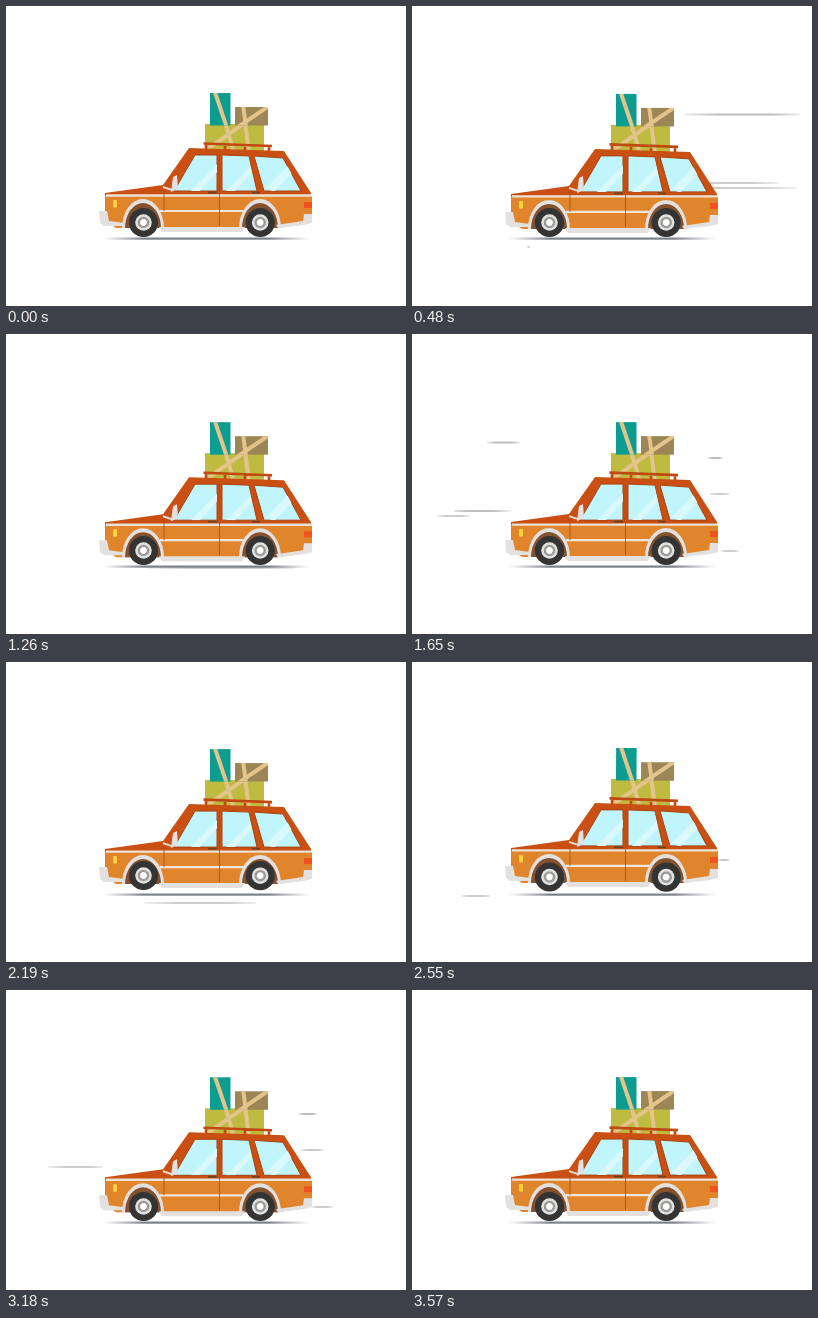
Recreate the animation shown at these times as an HTML page. Size 400 by 300 pixels, loop 3600 ms.

```html
<!DOCTYPE html>
<html lang="en">
<head>
<meta charset="utf-8">
<title>Road trip</title>
<style>
  html, body { margin: 0; width: 100%; height: 100%; overflow: hidden; background: #fff; }
  svg { display: block; width: 100vw; height: 100vh; }
  .dark { fill: #c95012; }
  .paint { fill: #e0852c; }
  .trim { fill: #e2e1df; }
  .arch { fill: #85522f; }
  .strap { fill: none; stroke: #e3c58c; stroke-width: 4; }
</style>
</head>
<body>
<svg viewBox="0 0 400 300">
  <defs>
    <linearGradient id="fade">
      <stop offset="0" stop-color="#bcbcbe" stop-opacity=".3"/>
      <stop offset=".3" stop-color="#bcbcbe"/>
      <stop offset=".75" stop-color="#bcbcbe"/>
      <stop offset="1" stop-color="#bcbcbe" stop-opacity=".3"/>
    </linearGradient>
    <linearGradient id="shade">
      <stop offset="0" stop-color="#7d8189" stop-opacity="0"/>
      <stop offset=".2" stop-color="#7d8189"/>
      <stop offset=".8" stop-color="#7d8189"/>
      <stop offset="1" stop-color="#7d8189" stop-opacity="0"/>
    </linearGradient>
    <path id="glass" d="M189 149H211V185H168ZM216 149L243 150L251 185H216ZM248 150L277 152L295 185H258Z"/>
    <clipPath id="panes"><use href="#glass"/></clipPath>
    <clipPath id="tealClip"><rect x="204" y="87" width="20.5" height="32.5"/></clipPath>
    <clipPath id="brownClip"><rect x="229" y="101" width="33" height="18.5"/></clipPath>
    <clipPath id="oliveClip"><rect x="199" y="118" width="59" height="27"/></clipPath>
    <g id="wheel">
      <circle r="14.600" fill="#343434"/>
      <circle r="8.300" fill="#e2e1df"/>
      <circle r="4.600" fill="#fff" stroke="#9c9b99" stroke-width="2.400"/>
    </g>
    <g id="fender">
      <path class="trim" d="M-21 5A21 29 0 0 1 21 5Z"/>
      <path class="arch" d="M-18 5A18 25 0 0 1 18 5Z"/>
    </g>
  </defs>

  <g id="lines" fill="url(#fade)"></g>
  <rect x="97" y="231.500" width="206" height="2.200" fill="url(#shade)"/>

  <g id="olive">
    <rect x="199" y="118" width="59" height="27" fill="#bebb40"/>
    <path class="strap" clip-path="url(#oliveClip)" d="M219 116L228 147M239 116L243 147M240 116L200 144"/>
  </g>
  <g id="brown">
    <rect x="229" y="101" width="33" height="18.500" fill="#9d8655"/>
    <path class="strap" clip-path="url(#brownClip)" d="M263 100L232 121M237 99L240 121"/>
  </g>
  <g id="teal">
    <rect x="204" y="87" width="20.500" height="32.500" fill="#0c9d90"/>
    <path class="strap" clip-path="url(#tealClip)" d="M208.500 85L221 122"/>
  </g>

  <g id="car">
    <path d="M197.500 137.500L266 140M200 137V143M219 138V144M239 139V144M263 140V146" fill="none" stroke="#c0490f" stroke-width="2.600"/>
    <path class="dark" d="M183 142L278 145L305 187V192H99V187L157 179Z"/>
    <use href="#glass" fill="#c0f5fd" stroke="#a9430f" stroke-width="1"/>
    <path clip-path="url(#panes)" fill="#d9f9fd" d="M184 186L214 155V163L193 186ZM219 186L245 160V168L228 186ZM260 182L282 160L286 167L268 186Z"/>
    <path class="paint" d="M99 189H306V210L298 217L272 222H110L99 214Z"/>
    <path d="M100 189.500H306" stroke="#ebe2d6" stroke-width="2.400"/>
    <path d="M154 205H238" stroke="#eee5d9" stroke-width="2.200"/>
    <path d="M213.500 149V220M158 184V205" stroke="#a94818" stroke-width=".8"/>
    <path d="M202 186.500H211M246 186.500H254" stroke="#70401f" stroke-width="1.800"/>
    <use href="#fender" x="137" y="217"/>
    <use href="#fender" x="254" y="217"/>
    <path class="trim" d="M153 221H239L236 226H156ZM93 205H101L103 215L118 217V220H98L94 217ZM270 219L297 215L298 208H306V217L298 219L272 222Z"/>
    <rect x="107" y="194" width="4" height="7.500" rx="1" fill="#ffd33d"/>
    <rect x="298" y="196" width="8" height="6" fill="#f2521b"/>
    <path class="trim" d="M167 171L171 169L172 183L165 186Z"/>
    <path d="M157 181L166 184" stroke="#dedbd7" stroke-width="2"/>
  </g>
  <use id="front" href="#wheel"/>
  <use id="rear" href="#wheel"/>
</svg>
<script>
const LOOP = 3600, STEP = 30;
const GAP = 1535;   // a lane sends its next streak after this time
const CALM = 3420;  // all streaks are gone by then
const LAG = .35;    // share of a run before the tail follows

const $ = id => document.getElementById(id);
const clamp = v => Math.min(1, Math.max(0, v));
const pulse = (t, at, width) => Math.exp(-(((t - at) / width) ** 2));
const move = (id, x, y, turn = 0, cx = 0, cy = 0) =>
  $(id).setAttribute('transform', `translate(${x} ${y}) rotate(${turn} ${cx} ${cy})`);

const streaks = [];

// One lane of wind: longer runs take longer, upper lanes are thicker
function lane(y, from, to, start) {
  const dur = 220 + .98 * (to - from);
  const h = y < 150 ? 2.2 : 1.5;
  for (let at = start % GAP; at + dur < CALM; at += GAP) {
    const el = document.createElementNS('http://www.w3.org/2000/svg', 'rect');
    el.setAttribute('y', y - h / 2);
    el.setAttribute('height', h);
    el.setAttribute('rx', h / 2);
    $('lines').append(el);
    streaks.push({ el, from, to, at, dur });
  }
}
lane(108.5, 75, 388, 1614);
lane(124, 150, 311, 1296);
lane(160, 137, 318, 1282);
lane(177, 42, 367, 1602);
lane(177, 42, 150, 3072);
lane(182, 25, 385, 1616);
lane(198, 150, 318, 2185);
lane(217, 150, 327, 1283);
lane(234, 49, 320, 2516);
lane(241, 115, 325, 476);

function drawStreak({ el, from, to, at, dur }, t) {
  const p = (t - at) / dur;
  const on = p > 0 && p < 1;
  el.style.display = on ? '' : 'none';
  if (!on) return;
  const x = q => from + (to - from) * clamp(q / (1 - LAG));
  el.setAttribute('x', x(p - LAG));
  el.setAttribute('width', x(p) - x(p - LAG));
}

// Free flight under constant gravity, then a small rebound
function hop(t, start, height, rebound = true) {
  const dur = 43 * Math.sqrt(height);
  const p = clamp((t - start) / dur);
  const rise = 4 * height * p * (1 - p);
  return rise + (rebound ? hop(t, start + dur, height * .12, false) : 0);
}

function draw(t) {
  streaks.forEach(s => drawStreak(s, t));

  const idle = .6 - .6 * Math.cos(2 * Math.PI * t / 360);
  let lift = 0, kick = 0;
  for (const [start, height] of [[852, 31], [2548, 36], [3300, 7]]) {
    lift += hop(t, start, height);
    kick += height / 8 * pulse(t, start + 48, 40);
  }

  move('car', 0, idle - kick);
  move('olive', lift * .04, idle - lift * .88, lift * .04, 228, 131);
  move('brown', lift * .04, idle - lift * .8, lift * .04, 245, 110);
  move('teal', lift * .05, idle - lift * .95, lift * .25, 214, 103);

  const bump = d => -3 * pulse(t, 2190 + d, 60) - 1.5 * pulse(t, 2550 + d, 60);
  move('front', 137.5, 216.5 + bump(0));
  move('rear', 254.2, 216.5 + bump(15));
}

const begin = performance.now();
function tick() {
  const t = (performance.now() - begin) % LOOP;
  draw(Math.floor(t / STEP) * STEP);
  requestAnimationFrame(tick);
}
tick();
</script>
</body>
</html>
```
